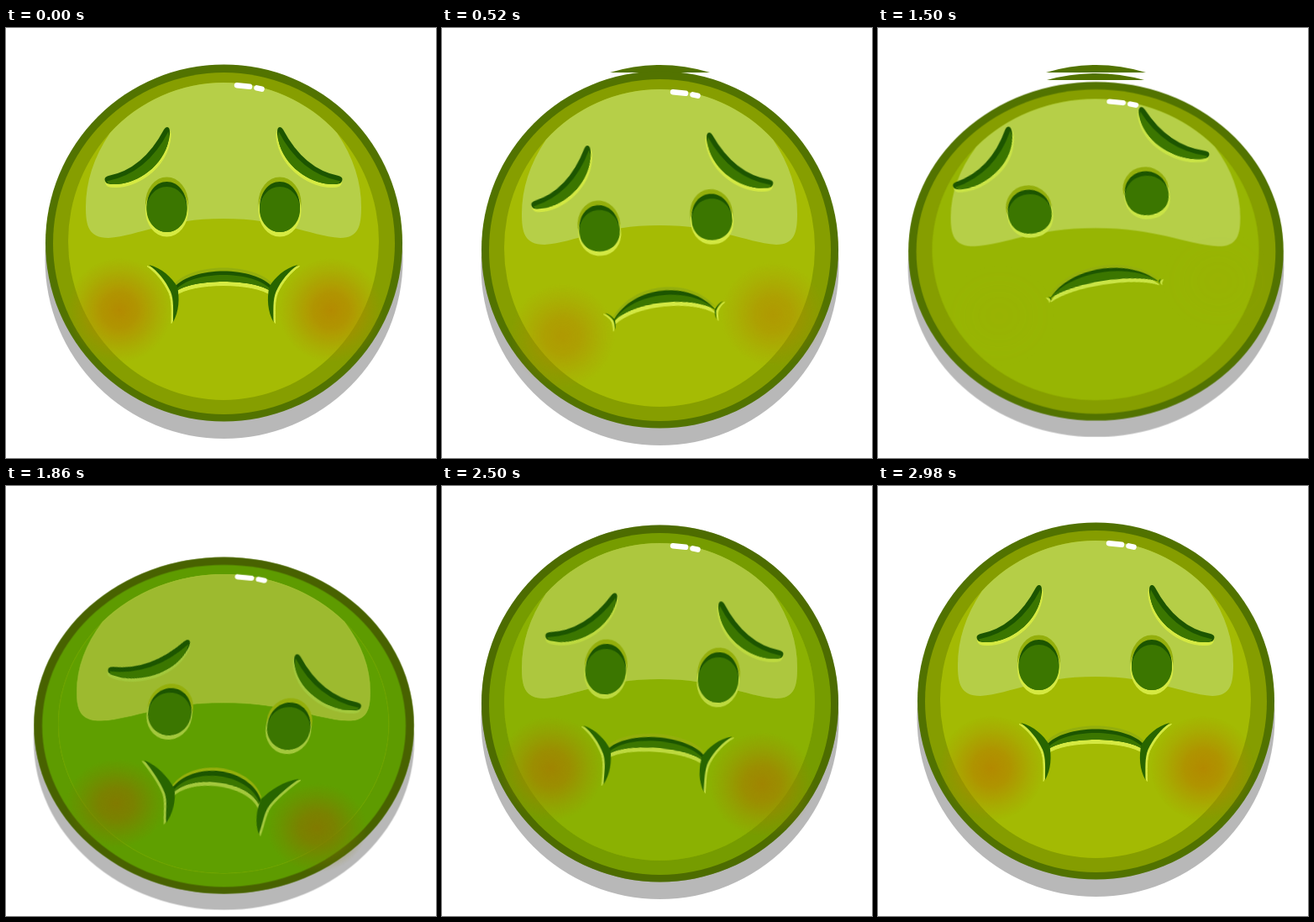
An HTML page without scripts that plays this animation: 512x512 px, repeating every 3 s.

```html
<!DOCTYPE html>
<html lang="en">
<head>
<meta charset="utf-8">
<title>Queasy face</title>
<style>
html, body { margin: 0; width: 100%; height: 100%; overflow: hidden; background: #fff; }
svg { display: block; width: 100vw; height: 100vh; }

.body, .face, .sick, .sickRim, .cheeks, .browL, .browR, .eye path, .lip path, .lipLo, .fold path, .caps, stop, .lime {
  animation: 3s linear infinite;
}
.body { transform-origin: 259.5px 256px; animation-name: body; }
.face { transform-origin: 258.75px 213px; animation-name: face; }
.cheeks { transform-origin: 261px 336px; animation-name: cheeks; }
.browL { transform-origin: 157px 152px; animation-name: browL; }
.browR { transform-origin: 361px 152px; animation-name: browR; }
.sick { opacity: 0; animation-name: sick; }
.sickRim { opacity: 0; animation-name: sickRim; }
.caps { animation-name: caps; }
stop { stop-color: #b48700; animation-name: blush; }
.lime { fill: #d6ea42; stroke: #d6ea42; animation-name: lime; }
.eye path { animation-name: eye; }
.lip path { animation-name: lip; }
.lipLo { animation-name: lipLo; }
.fold path { animation-name: fold; }
.olive { fill: #94af0c; stroke: #94af0c; }
.dark { fill: #1c5500; }
.mid { fill: #3b7600; }
.eye .olive, .eye .rim { stroke-width: 3; }
.brow .lime, .lip .lime, .lip .olive, .fold .lime { stroke: none; }

@keyframes body {
  0% { transform: none; animation-timing-function: ease-in; }
  12% { transform: translateY(4px); animation-timing-function: cubic-bezier(.2,.6,.5,1); }
  28%, 36.67% { transform: translateY(10px); animation-timing-function: ease-in-out; }
  45.3% { transform: translateY(22px) scale(1.066,.936); animation-timing-function: ease-in; }
  50% { transform: translateY(10px) scale(1.052,.948); animation-timing-function: ease-out; }
  56% { transform: translateY(-15px) scale(.95,1.06); animation-timing-function: ease-in-out; }
  62.7% { transform: translateY(30px) scale(1.066,.94); animation-timing-function: ease-in-out; }
  66.67% { transform: translateY(26px) scale(1.047,.957); }
  83.33% { transform: translateY(3px) scale(1,1); animation-timing-function: ease-out; }
  97%, 100% { transform: none; }
}
@keyframes face {
  0% { transform: none; animation-timing-function: ease-in; }
  12% { transform: translate(-1.5px,7px) rotate(-1.7deg); animation-timing-function: cubic-bezier(.2,.6,.5,1); }
  32.67%, 36.67% { transform: translate(-7px,13.5px) rotate(-9deg); animation-timing-function: ease-in-out; }
  45.3% { transform: translate(-8px,15px) rotate(-10deg); animation-timing-function: ease-in; }
  50% { transform: translate(-8.3px,-18.2px) rotate(-10deg); animation-timing-function: ease-out; }
  56% { transform: translate(-1px,-30px) rotate(-3deg); animation-timing-function: ease-in-out; }
  62.7% { transform: translate(7px,36px) rotate(8deg); }
  66.67% { transform: translate(7px,33.6px) rotate(8deg); }
  83.33% { transform: translate(3.3px,7px) rotate(4.25deg); animation-timing-function: ease-out; }
  97%, 100% { transform: none; }
}
@keyframes sick {
  0%, 44% { opacity: 0; }
  50% { opacity: .2; }
  62%, 66.67% { opacity: 1; }
  83.33% { opacity: .37; }
  100% { opacity: 0; }
}
@keyframes sickRim {
  0%, 50% { opacity: 0; }
  62%, 66.67% { opacity: 1; }
  83.33% { opacity: .37; }
  100% { opacity: 0; }
}
@keyframes blush {
  0%, 50% { stop-color: #b48700; }
  62%, 66.67% { stop-color: #827800; }
  83.33% { stop-color: #a08200; }
  100% { stop-color: #b48700; }
}
@keyframes lime {
  0%, 12% { fill: #d6ea42; stroke: #d6ea42; }
  32.67%, 50% { fill: #cae446; stroke: #cae446; }
  62%, 66.67% { fill: #a3c83c; stroke: #a3c83c; }
  100% { fill: #d6ea42; stroke: #d6ea42; }
}
@keyframes cheeks {
  0% { opacity: 1; transform: none; }
  12% { opacity: .85; }
  32.67% { opacity: .25; }
  45%, 50% { opacity: .04; transform: none; }
  62%, 66.67% { opacity: 1; transform: scale(.9); }
  83.33%, 100% { opacity: 1; transform: none; }
}
@keyframes browL {
  0% { transform: none; }
  12% { transform: translate(-2.2px,-2px) rotate(0deg); }
  32.67%, 36.67% { transform: translate(-9.8px,-8.6px) rotate(-3.3deg); }
  50% { transform: translate(-6px,-14px) rotate(0deg); }
  62.7%, 66.67% { transform: translate(3px,-3.5px) rotate(10.5deg); }
  83.33% { transform: translate(1.5px,1px) rotate(4.6deg); }
  97%, 100% { transform: none; }
}
@keyframes browR {
  0% { transform: none; }
  12% { transform: translate(2.3px,-2px) rotate(2deg); }
  32.67%, 36.67% { transform: translate(10.8px,-4.4px) rotate(10deg); }
  50% { transform: translate(8px,-8px) rotate(7.4deg); }
  62.7%, 66.67% { transform: translate(-.6px,1px) rotate(-6deg); }
  83.33% { transform: translate(-1.3px,2px) rotate(-4deg); }
  97%, 100% { transform: none; }
}
@keyframes eye {
  0%, 60%, 100% { d: path("M-24 0C-24 -16.6 -13.3 -30 0 -30C13.3 -30 24 -16.6 24 0C24 16.6 13.3 30 0 30C-13.3 30 -24 16.6 -24 0Z"); }
  12% { d: path("M-24 0C-24 -16 -13.3 -28.5 0 -28.5C13.3 -28.5 24 -16 24 0C24 16 13.3 28.5 0 28.5C-13.3 28.5 -24 16 -24 0Z"); }
  32.67%, 40% { d: path("M-24 4C-24 -12 -14 -25 0 -25C14 -25 24 -12 24 4C24 20 14 24 0 24C-14 24 -24 20 -24 4Z"); }
  50% { d: path("M-24.5 0C-24.5 -15 -14 -27.4 0 -27.4C14 -27.4 24.5 -15 24.5 0C24.5 16 15 27.4 0 27.4C-15 27.4 -24.5 16 -24.5 0Z"); }
}
@keyframes lip {
  0%, 83.33%, 100% { d: path("M200 309C222 283 296 283 318 309L316 314C296 298 222 298 202 314Z"); }
  12% { d: path("M198 321C225 284 293 284 320 321L320 321C293 301 225 301 199 322Z"); }
  32.67%, 38% { d: path("M196 331C225 287 291 287 318 331L318 331C291 310 225 310 196 331Z"); }
  50% { d: path("M196 324C225 289 291 289 320 324L320 324C291 309 225 309 196 324Z"); }
  62.7%, 66.67% { d: path("M207 309C225 269 289 269 307 309L305 315C289 286 225 286 209 315Z"); }
}
@keyframes lipLo {
  0%, 83.33%, 100% { d: path("M202 312C222 288 296 288 316 312L316 314C296 298 222 298 202 314Z"); }
  12% { d: path("M199 321C225 291 293 291 320 321L320 321C293 301 225 301 199 322Z"); }
  32.67%, 38% { d: path("M196 331C225 296 291 296 318 331L318 331C291 310 225 310 196 331Z"); }
  50% { d: path("M196 324C225 295 291 295 320 324L320 324C291 309 225 309 196 324Z"); }
  62.7%, 66.67% { d: path("M208 313C225 276 289 276 306 313L305 315C289 286 225 286 209 315Z"); }
}
@keyframes fold {
  0%, 83.33%, 100% { d: path("M170 282C186 286 197 297 204 308C207 322 206 338 199 350C199 336 200 324 196 314C190 301 181 290 170 282Z"); }
  12% { d: path("M185 308C191 310 196 315 200 321C201 327 201 332 199 338C199 332 199 328 198 323C195 316 190 312 185 308Z"); }
  30%, 48% { d: path("M196 328C196 328 196 328 196 328C196 328 196 328 196 328C196 328 196 328 196 328C196 328 196 328 196 328Z"); }
  50% { d: path("M194 322C195 322 196 323 197 324C197 325 197 326 196 327C196 326 196 325 196 325C195 324 195 323 194 322Z"); }
  62.7%, 66.67% { d: path("M170 275C188 281 201 294 210 307C215 322 213 342 207 354C204 338 205 326 200 315C193 301 182 288 170 275Z"); }
}
@keyframes caps {
  0%, 54% { visibility: visible; }
  54.01%, 100% { visibility: hidden; }
}
</style>
</head>
<body>
<svg viewBox="0 0 512 512">
  <defs>
    <radialGradient id="blush">
      <stop offset="0" stop-opacity=".95"/>
      <stop offset=".35" stop-opacity=".75"/>
      <stop offset=".75" stop-opacity=".25"/>
      <stop offset="1" stop-opacity="0"/>
    </radialGradient>
    <path id="shine" d="M95 213C95 235 98 250 122 250C160 247 190 227 259 227C328 227 360 247 398 250C420 250 423 235 423 213Q423 168 394.200 125A185 189 0 0 0 123.800 125Q95 168 95 213Z"/>
    <path id="brow" d="M119 184Q115 178 122 176Q163 168 188 121Q191 116 194 119Q197 124 192 140C182 170 150 187 128 186Q121 186 119 184Z"/>
    <path id="browLo" d="M120 182.500Q168 173 193.500 123Q195 130 192 140C182 170 150 187 128 186Q121 186 120 182.500Z"/>
  </defs>

  <g class="caps" fill="#527300">
    <path d="M200 53Q259.500 35 319 53Z"/>
    <path d="M201 62Q259 46 317 62Z"/>
  </g>

  <g class="body">
    <circle cx="259.500" cy="276" r="213" fill="#000" opacity=".28"/>

    <circle cx="259.500" cy="256" r="212.500" fill="#527300"/>
    <circle cx="259.500" cy="256.500" r="203.500" fill="#869e00"/>
    <g class="sickRim">
      <circle cx="259.500" cy="256" r="212.500" fill="#486200"/>
      <circle cx="259.500" cy="256.500" r="203.500" fill="#5e9b00"/>
    </g>

    <ellipse cx="259" cy="254" rx="185" ry="189" fill="#a5bb04"/>
    <ellipse class="sick" cx="259" cy="254" rx="185" ry="189" fill="#5f9f00"/>

    <use href="#shine" fill="#b6cf48"/>
    <g class="sickRim"><use href="#shine" fill="#9dba2f"/></g>

    <g fill="none" stroke="#fff" stroke-width="6.500" stroke-linecap="round">
      <path d="M275 68.200L290 69.800M298.500 71.300L304.500 72.700"/>
    </g>

    <g class="face">
      <g class="cheeks" fill="url(#blush)">
        <circle cx="135" cy="336" r="62"/>
        <circle cx="387" cy="336" r="62"/>
      </g>

      <g class="browL brow">
        <use href="#brow" class="lime" x="1" y="3.500"/>
        <use href="#brow" class="dark"/>
        <use href="#browLo" class="mid"/>
      </g>
      <g class="browR brow">
        <g transform="matrix(-1 0 0 1 518 0)">
          <use href="#brow" class="lime" x="1" y="3.500"/>
          <use href="#brow" class="dark"/>
          <use href="#browLo" class="mid"/>
        </g>
      </g>

      <g class="eye" transform="translate(191.500 213)">
        <g class="olive" transform="translate(0 -4)"><path d="M0 0Z"/></g>
        <g class="lime rim" transform="translate(0 4)"><path d="M0 0Z"/></g>
        <path class="dark" d="M0 0Z"/>
        <g transform="translate(0 3) scale(1 .9)"><path class="mid" d="M0 0Z"/></g>
      </g>
      <g class="eye" transform="translate(326 213)">
        <g class="olive" transform="translate(0 -4)"><path d="M0 0Z"/></g>
        <g class="lime rim" transform="translate(0 4)"><path d="M0 0Z"/></g>
        <path class="dark" d="M0 0Z"/>
        <g transform="translate(0 3) scale(1 .9)"><path class="mid" d="M0 0Z"/></g>
      </g>

      <g class="lip">
        <g class="olive" transform="translate(0 -4)"><path d="M0 0Z"/></g>
        <g class="lime" transform="translate(0 4.500)"><path d="M0 0Z"/></g>
      </g>
      <g class="fold">
        <g class="lime" transform="translate(-2 1.500)"><path d="M0 0Z"/></g>
      </g>
      <g class="fold" transform="matrix(-1 0 0 1 517.500 0)">
        <g class="lime" transform="translate(-2 1.500)"><path d="M0 0Z"/></g>
      </g>
      <g class="lip"><path class="dark" d="M0 0Z"/></g>
      <path class="lipLo mid" d="M0 0Z"/>
      <g class="fold" fill="#286500"><path d="M0 0Z"/></g>
      <g class="fold" fill="#286500" transform="matrix(-1 0 0 1 517.500 0)"><path d="M0 0Z"/></g>
    </g>
  </g>
</svg>
</body>
</html>
```
